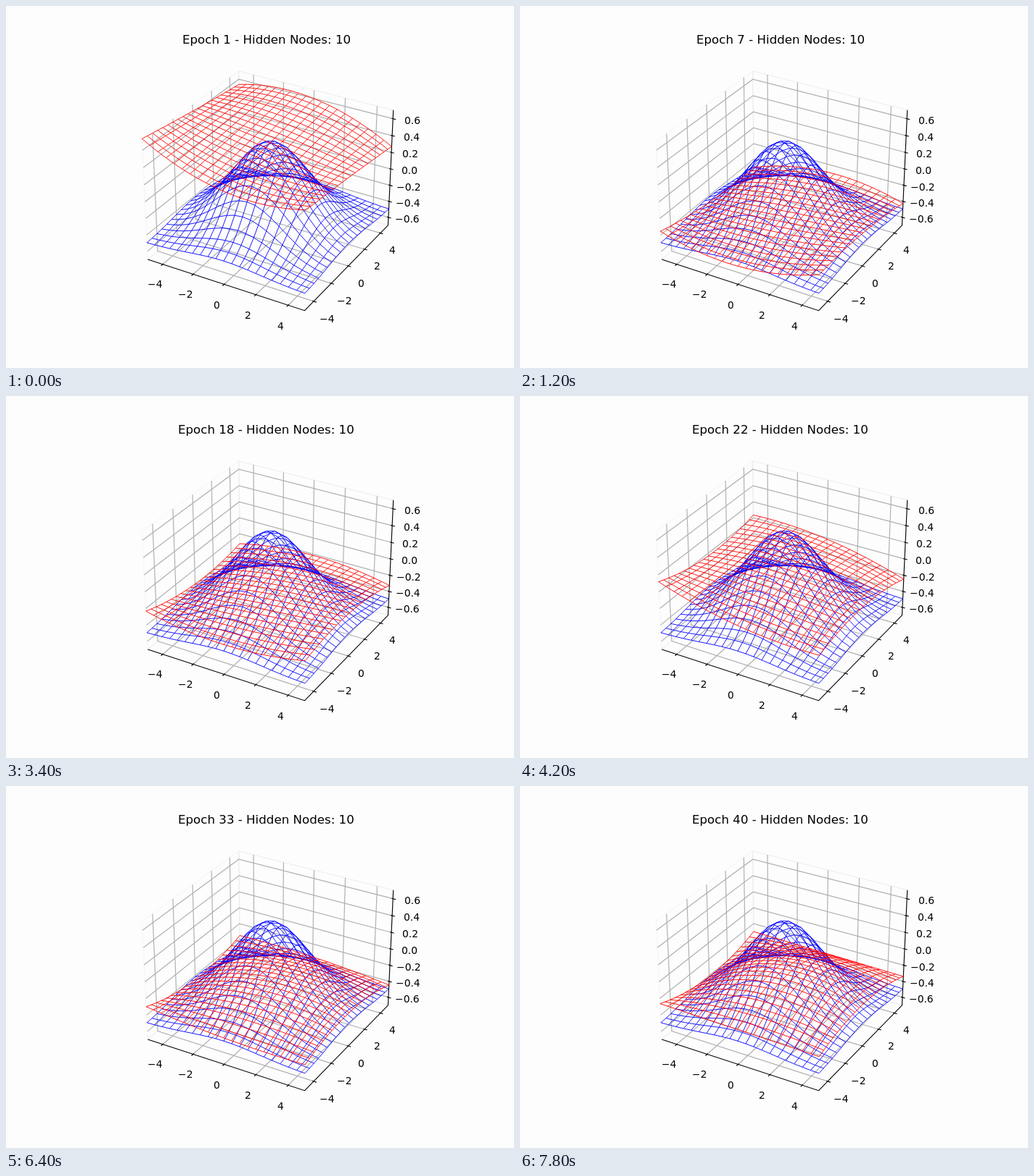
Recreate the animation shown at these times as an HTML page with a canvas. Size 700 by 500 pixels, loop 8000 ms.

```html
<!DOCTYPE html>
<html lang="en">
<head>
<meta charset="utf-8">
<title>Surface fitting</title>
<style>
  html, body { margin: 0; width: 100%; height: 100%; overflow: hidden; background: #fdfdfd; }
  canvas { display: block; }
</style>
</head>
<body>
<canvas id="stage" width="700" height="500"></canvas>
<script>
const ctx = document.getElementById('stage').getContext('2d');
const FONT = '"DejaVu Sans", Verdana, sans-serif';
const EPOCH_MS = 200, EPOCHS = 40, CELLS = 20;
const XY_MAX = 5, Z_MAX = 0.7;

// Perspective camera: elevation 30°, azimuth -60°, distance 10.
const XY_SCALE = 0.5952 / XY_MAX, Z_SCALE = 0.4464 / Z_MAX;
function depth(x, y, z) {
  return 10 - (0.433 * x - 0.75 * y) * XY_SCALE - 0.5 * z * Z_SCALE;
}
function project([x, y, z]) {
  const k = 2081.08 / depth(x, y, z);
  const right = (0.866 * x + 0.5 * y) * XY_SCALE;
  const up = (-0.25 * x + 0.433 * y) * XY_SCALE + 0.866 * z * Z_SCALE;
  return [363.95 + right * k, 247.3 - up * k];
}

function strokePaths(paths, color, width) {
  ctx.beginPath();
  for (const path of paths) {
    path.forEach((point, i) => ctx[i ? 'lineTo' : 'moveTo'](...project(point)));
  }
  ctx.strokeStyle = color;
  ctx.lineWidth = width;
  ctx.stroke();
}

function centeredText(label, x, baseline, size) {
  ctx.font = `${size}px ${FONT}`;
  ctx.fillStyle = '#000';
  const left = x - ctx.measureText(label).width / 2;
  ctx.fillText(label, Math.round(left), Math.round(baseline));
}

const coords = Array.from({ length: CELLS + 1 }, (_, i) => XY_MAX * (2 * i / CELLS - 1));

function makeSurface(color, height) {
  const rows = coords.map(y => coords.map(x => [x, y, height(x, y)]));
  const columns = coords.map((_, i) => rows.map(row => row[i]));
  const nearest = Math.min(...rows.flat().map(p => depth(...p)));
  return { color, nearest, paths: [...rows, ...columns] };
}

const goal = makeSurface('#00f', (x, y) => Math.exp(-(x * x + y * y) / 10) - 0.5);

// The fit swings around its resting place: [epoch, level, tilt along x].
const SWING = [
  [1, 0.5, -0.134], [7, -0.39, 0.04], [13, -0.555, 0.195], [22, -0.065, -0.142],
  [28, -0.18, 0.015], [33, -0.372, -0.047], [40, -0.3, -0.018]
];

// Smooth cubic curve through one column of the swing.
function swing(epoch, column) {
  const last = SWING.length - 1;
  const next = Math.max(1, SWING.findIndex(key => key[0] >= epoch));
  const slope = k => {
    const before = SWING[Math.max(k - 1, 0)], after = SWING[Math.min(k + 1, last)];
    return (after[column] - before[column]) / (after[0] - before[0]);
  };
  const a = SWING[next - 1], b = SWING[next];
  const span = b[0] - a[0], s = (epoch - a[0]) / span;
  return a[column] + (b[column] - a[column]) * s * s * (3 - 2 * s) +
    span * s * (1 - s) * (slope(next - 1) * (1 - s) - slope(next) * s);
}

// A tilted sheet whose early twist fades while a central bump grows.
function fitted(epoch) {
  const progress = epoch / EPOCHS;
  const level = swing(epoch, 1), tiltX = swing(epoch, 2);
  const tiltY = -0.1 * Math.exp(-epoch / 25);
  const bendX = 0.2 * (1 - progress);
  const bendY = 0.14 * (1 - Math.exp(-epoch / 14));
  const bump = 0.25 * progress ** 2;
  return makeSurface('#f00', (x, y) => {
    const u = x / XY_MAX, v = y / XY_MAX;
    const archX = 1 - u * u, archY = 1 - v * v;
    return level + tiltX * u + tiltY * v +
      bendX * archX * v + bendY * archY * u + bump * archX * archY;
  });
}

const xyTicks = [-4, -2, 0, 2, 4];
const zTicks = [-3, -2, -1, 0, 1, 2, 3].map(n => n / 5);

function drawBox() {
  const m = XY_MAX, h = Z_MAX;
  const pane = (color, ...corners) => strokePaths([[...corners, corners[0]]], color, 1.39);
  pane('rgba(242,242,242,.5)', [-m, -m, -h], [-m, m, -h], [-m, m, h], [-m, -m, h]);
  pane('rgba(230,230,230,.5)', [-m, m, -h], [m, m, -h], [m, m, h], [-m, m, h]);
  pane('rgba(236,236,236,.5)', [-m, -m, -h], [m, -m, -h], [m, m, -h], [-m, m, -h]);

  strokePaths([
    ...xyTicks.map(x => [[x, -m, -h], [x, m, -h], [x, m, h]]),
    ...xyTicks.map(y => [[m, y, -h], [-m, y, -h], [-m, y, h]]),
    ...zTicks.map(z => [[-m, -m, z], [-m, m, z], [m, m, z]])
  ], '#b0b0b0', 1.2);

  const outer = m + 0.167, inner = m - 0.083;
  strokePaths([
    [[-m, -m, -h], [m, -m, -h], [m, m, -h], [m, m, h]],
    ...xyTicks.map(x => [[x, -outer, -h], [x, -inner, -h]]),
    ...xyTicks.map(y => [[outer, y, -h], [inner, y, -h]]),
    ...zTicks.map(z => [[outer, m, z], [inner, m, z]])
  ], '#000', 1.11);

  const side = m * 1.161, below = -h * 1.161;
  const label = (value, point, digits) => {
    const [x, y] = project(point);
    centeredText(value.toFixed(digits).replace('-', '\u2212'), x, y + 10.5, 13.89);
  };
  xyTicks.forEach(v => {
    label(v, [v, -side, below], 0);
    label(v, [side, v, below], 0);
  });
  zTicks.forEach(v => label(v, [side, side, v], 1));
}

function draw(epoch) {
  ctx.fillStyle = '#fdfdfd';
  ctx.fillRect(0, 0, 700, 500);
  drawBox();
  [goal, fitted(epoch)]
    .sort((a, b) => b.nearest - a.nearest)
    .forEach(s => strokePaths(s.paths, s.color, 0.9));
  centeredText(`Epoch ${epoch} - Hidden Nodes: 10`, 358.75, 52, 16.67);
}

let shown = 0;
function tick() {
  const epoch = Math.floor(performance.now() / EPOCH_MS) % EPOCHS + 1;
  if (epoch !== shown) draw(shown = epoch);
  requestAnimationFrame(tick);
}
tick();
</script>
</body>
</html>
```
